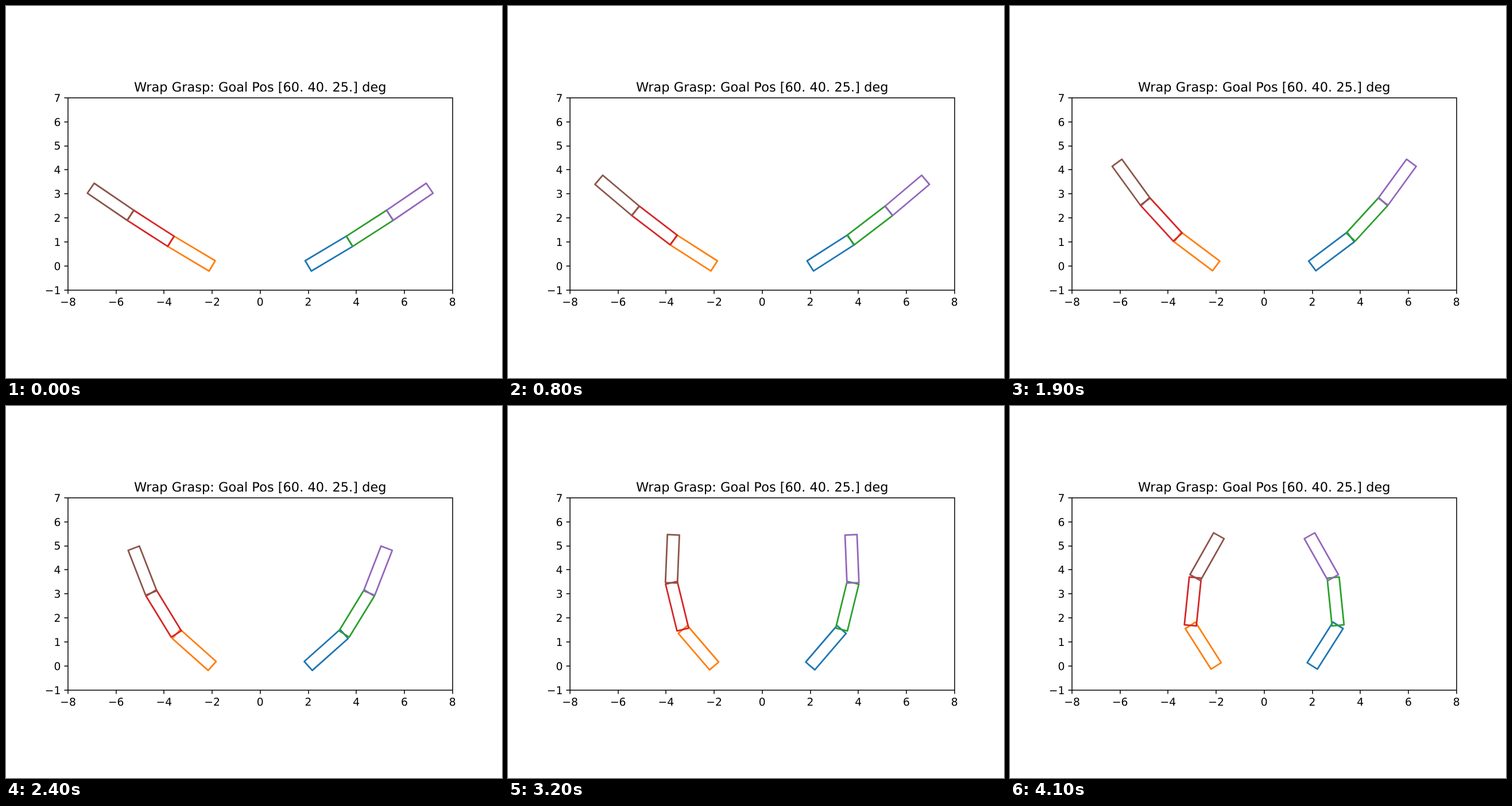
These frames come from a looping animation (864x648 px, 4.27 s). An HTML page:

```html
<!DOCTYPE html>
<html lang="en">
<head>
<meta charset="utf-8">
<title>Wrap Grasp</title>
<style>
  html, body { margin: 0; width: 100%; height: 100%; overflow: hidden; background: #fff; }
  svg { display: block; }
  text { font: 18.75px "DejaVu Sans", sans-serif; text-rendering: geometricPrecision; }
  .title { font-size: 22.5px; }
  .mid { text-anchor: middle; }
  .end { text-anchor: end; }
  #axes { fill: none; stroke: #000; stroke-width: 1.5; }
  #arms { fill: none; stroke-width: 2.8; stroke-linejoin: round; }
</style>
</head>
<body>
<svg width="864" height="648" viewBox="0 0 864 648">
  <g id="labels"><text class="title mid" x="442.8" y="148.6">Wrap Grasp: Goal Pos [60. 40. 25.] deg</text></g>
  <g id="arms"></g>
  <path id="axes"/>
</svg>
<script>
const UNIT = 41.85, X0 = 442.8, Y0 = 452.79;
const LOOP = 4270, STEP = 100, LAST = 4100;
const LENGTH = 2, HALF = 0.25, BASE = 2;

// time in ms, then the heading of each link in degrees
const KEYS = [
  [0, 30.85, 32.75, 34.3],
  [500, 31.8, 35, 36.65],
  [700, 32, 35.6, 37.3],
  [1100, 34.6, 42.8, 48.9],
  [1200, 34.9, 43.5, 49.6],
  [1900, 36.9, 47.5, 54],
  [2800, 45.5, 67.4, 80.5],
  [3600, 53.2, 85.1, 104.2],
  [4100, 57.55, 95.8, 119.45]
];
// right and left colour per link, from the base outwards
const COLORS = [['#1f77b4', '#ff7f0e'], ['#2ca02c', '#d62728'], ['#9467bd', '#8c564b']];

const px = x => X0 + x * UNIT;
const py = y => Y0 - y * UNIT;

function add(parent, tag, attrs, text = '') {
  const el = document.createElementNS('http://www.w3.org/2000/svg', tag);
  for (const name in attrs) el.setAttribute(name, attrs[name]);
  el.textContent = text;
  return document.getElementById(parent).appendChild(el);
}

function drawAxes() {
  const label = n => String(n).replace('-', '\u2212');
  let d = 'M108 160H778V495H108Z';
  for (let x = -8; x <= 8; x += 2) {
    d += `M${Math.round(px(x))} 495v6.56`;
    add('labels', 'text', { class: 'mid', x: px(x), y: 522 }, label(x));
  }
  for (let y = -1; y <= 7; y++) {
    d += `M108 ${Math.round(py(y))}h-6.56`;
    add('labels', 'text', { class: 'end', x: 95.4, y: py(y) + 6.9 }, label(y));
  }
  document.getElementById('axes').setAttribute('d', d);
}

function headings(t) {
  let i = 1;
  while (i < KEYS.length - 1 && t > KEYS[i][0]) i++;
  const a = KEYS[i - 1], b = KEYS[i];
  const k = (t - a[0]) / (b[0] - a[0]);
  return [1, 2, 3].map(j => (a[j] + (b[j] - a[j]) * k) * Math.PI / 180);
}

function drawArms(t) {
  let x = BASE, y = 0;
  headings(t).forEach((angle, i) => {
    const c = Math.cos(angle), s = Math.sin(angle);
    const nx = -s * HALF, ny = c * HALF;
    const ex = x + LENGTH * c, ey = y + LENGTH * s;
    const corners = [[x + nx, y + ny], [ex + nx, ey + ny], [ex - nx, ey - ny], [x - nx, y - ny]];
    [1, -1].forEach((side, j) => {
      const points = corners.map(p => px(side * p[0]).toFixed(2) + ',' + py(p[1]).toFixed(2));
      links[i][j].setAttribute('points', points.join(' '));
    });
    x = ex;
    y = ey;
  });
}

const links = COLORS.map(pair => pair.map(stroke => add('arms', 'polygon', { stroke })));
const start = performance.now();

function tick() {
  const t = (performance.now() - start) % LOOP;
  drawArms(Math.min(Math.floor(t / STEP) * STEP, LAST));
  requestAnimationFrame(tick);
}

drawAxes();
tick();
</script>
</body>
</html>
```
